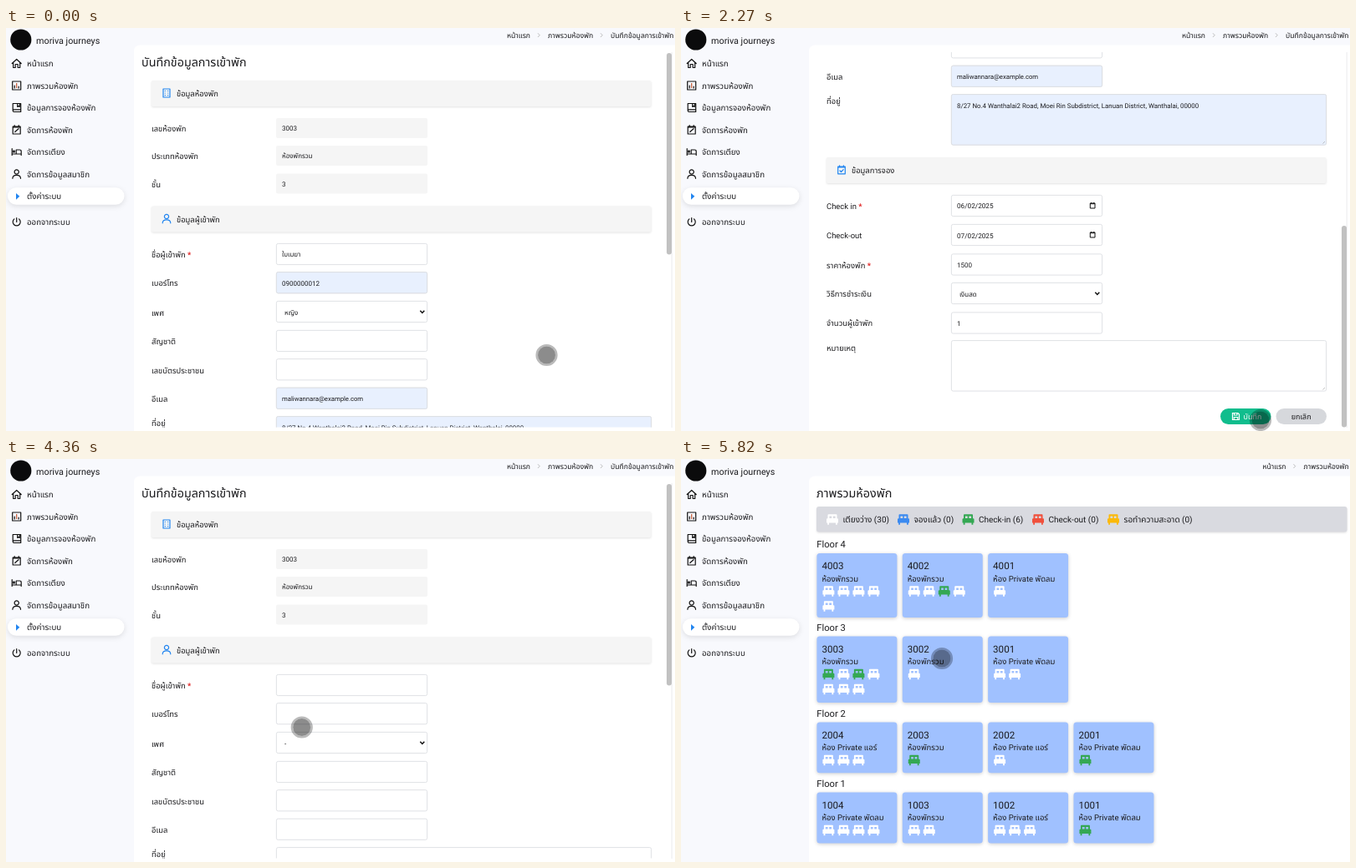
An HTML page that plays this animation: 800 by 483 pixels, repeating every 6 s.

```html
<!DOCTYPE html>
<html lang="th">
<head>
<meta charset="utf-8">
<title>Guest record form</title>
<style>
html, body { margin: 0; width: 100%; height: 100%; overflow: hidden; background: #f8f9fd; }
svg { display: block; width: 800px; height: 483px; }
text { font-family: Roboto, "Noto Sans Thai", "Noto Sans", sans-serif; text-rendering: geometricPrecision; fill: #1c1c1f; white-space: pre; }
#plain text { font-family: "Noto Sans", "Noto Sans Thai Looped", "Noto Sans Thai", sans-serif; fill: #000; }
.line { fill: none; stroke: #111; stroke-width: 1.2; stroke-linejoin: round; stroke-linecap: round; }
.blue { stroke: #2185f0; }
.shadow { filter: drop-shadow(0 1px 1px rgba(0, 0, 0, .11)); }
.card { filter: drop-shadow(0 1px 2px rgba(0, 0, 0, .2)); }
.pill { fill: #fff; filter: drop-shadow(0 2px 3px rgba(0, 0, 0, .11)); }
</style>
</head>
<body>
<svg id="stage" viewBox="0 0 800 483"></svg>
<script>
const FRAME = 1000 / 11, LOOP = 6000;

// ---- drawing helpers ----
const text = (x, y, size, str, attrs = '') =>
  `<text x="${x}" y="${y}" font-size="${size}" ${attrs}>${str}</text>`;
const box = (x, y, w, h, fill, attrs = '') =>
  `<rect x="${x}" y="${y}" width="${w}" height="${h}" fill="${fill}" ${attrs}/>`;
const line = (d, attrs = 'class="line"') => `<path d="${d}" ${attrs}/>`;
const group = (id, body, attrs = '') => `<g id="${id}" ${attrs}>${body}</g>`;
const at = (x, y, body) => `<g transform="translate(${x} ${y})">${body}</g>`;

// ---- side menu ----
const menu = ['หน้าแรก', 'ภาพรวมห้องพัก', 'ข้อมูลการจองห้องพัก', 'จัดการห้องพัก',
  'จัดการเตียง', 'จัดการข้อมูลสมาชิก', 'ตั้งค่าระบบ', 'ออกจากระบบ'];
const menuIcons = [
  'M-5.5 0L0-5L5.5 0M-4-1V5H-1.5V1H1.5V5H4V-1',
  'M-5-5H5V5H-5ZM-2.5 3V0M2.5 3V1',
  'M-4.5 3.5V-5H5V5H-3Q-4.5 5-4.5 3.5Q-4.5 2.3-3 2.3H5M1-5V-1L2.3-2L3.6-1V-5',
  'M-4.5-4H4.5V5H-4.5ZM-4.5-3H4.5M-2.5-5.5V-4M2.5-5.5V-4M-2 2.5L2.3-1.3',
  'M-5.5-4V4M-5.5 2.5H5.5V4M5.5 2.5V-.5Q5.5-2.5 3.5-2.5H-.5V2.5M-4-1.5H-2.5V.3H-4Z',
  'M-2.6-2.6A2.6 2.6 0 1 0 2.6-2.6A2.6 2.6 0 1 0-2.6-2.6M-4.8 5.3Q-4.6 1.4 0 1.4Q4.6 1.4 4.8 5.3',
  '',
  'M0-5V0M-2.8-3.6A4.5 4.5 0 1 0 2.8-3.6'
];
const menuY = [42.5, 69, 95.5, 122, 148.5, 175, 201.5, 232.5];
const plainY = [42.5, 67.5, 93, 118.5, 143.5, 168.5, 193, 223];

const pill = (y, h) => box(2, y - h / 2, 139.5, h, '#fff', `rx="${h / 2}" class="pill"`) +
  line(`M12 ${y - 3.6}L16.3 ${y + .3}L12 ${y + 4.2}Z`, 'fill="#2185f0"');
const styledMenu = pill(201.5, 20.5) + text(36, 18.8, 10.8, 'moriva journeys') + menu.map((m, i) =>
  text(25, menuY[i] + 3.6, 9.75, m) + at(12.7, menuY[i], line(menuIcons[i]))).join('') +
  line('M12.7 72V66', 'stroke="#c2562f" stroke-width="1.2"');
const plainMenu = pill(193, 17.5) + text(36, 18.8, 10, 'moriva journeys') + menu.map((m, i) =>
  text(i === 6 ? 25.5 : 22, plainY[i] + 3.4, 9.75, m, 'font-weight="500"')).join('');

// ---- page frame ----
const crumbs = (items) => items.map(([x, label], i) => text(x, 11.5, 8.65, label) +
  (i ? line(`M${x - 12} 6.3L${x - 9.8} 8.6L${x - 12} 10.9`, 'fill="none" stroke="#aaa" stroke-width=".8"') : '')).join('');
const panel = '<path d="M153 483V28Q153 20.5 160.5 20.5H800V483Z" fill="#fff"/>';

// ---- form ----
const star = '<tspan fill="#e02020" font-weight="700"> *</tspan>';
const label = (y, str) => text(174, y + 3.5, 9.45, str);
const value = (y, str, size = 8, x = 330) => text(x, y + 3, size, str);
const input = (y, fill = '#fff', w = 181, h = 25.2) =>
  box(323.4, y - 12.6, w - .8, h, fill, 'rx="2" stroke="#dcdee2" stroke-width=".9"');
const locked = (y, str) => box(323, y - 12, 181, 24, '#f5f5f5', 'rx="2"') + value(y, str);
const arrow = (y) => line(`M495.3 ${y - 1.3}L497.8 ${y + 1.4}L500.3 ${y - 1.3}`, 'fill="none" stroke="#111" stroke-width="1.5"');
const calendar = (y) => line(`M489.3 ${y - 3}H495V${y + 3}H489.3ZM489.3 ${y - 2.3}H495M490.5 ${y - 3.8}V${y - 3}M493.8 ${y - 3.8}V${y - 3}`,
  'fill="none" stroke="#111" stroke-width="1"');
const section = (y, str, icon) => box(174, y, 597.5, 31, '#f5f5f5', 'rx="2" class="shadow"') +
  at(192, y + 15, line(icon, 'class="line blue"')) + text(204, y + 19, 9.45, str);

const building = 'M-4-5H4V5H-4ZM-1.8-2.7H-1.6M1.6-2.7H1.8M-1.8 0H-1.6M1.6 0H1.8M-1.8 2.7H-1.6M1.6 2.7H1.8';
const booked = 'M-4.3-4H4.3V4.8H-4.3ZM-4.3-3H4.3M-2.4-5.2V-4M2.4-5.2V-4M-2 1L-.5 2.5L2.2-.3';

const labels = [
  [120, 'เลขห้องพัก'], [153.5, 'ประเภทห้องพัก'], [187, 'ชั้น'],
  [271, 'ชื่อผู้เข้าพัก' + star], [305.5, 'เบอร์โทร'], [341, 'เพศ'], [375.5, 'สัญชาติ'],
  [410, 'เลขบัตรประชาชน'], [444, 'อีเมล'], [473, 'ที่อยู่'],
  [599, 'Check in' + star], [634.5, 'Check-out'], [670, 'ราคาห้องพัก' + star],
  [704.5, 'วิธีการชำระเงิน'], [739.5, 'จำนวนผู้เข้าพัก'], [769, 'หมายเหตุ']
];
const AUTO = '#e8f0fe';
const filled = input(305.2, AUTO) + input(443.8, AUTO) + input(478.2, AUTO, 449, 60.5) +
  value(271, 'ใบเมฆา') + value(305.5, '0900000012') + value(340.5, 'หญิง', 8, 333) +
  value(444, 'maliwannara@example.com', 7.7) +
  value(479, '8/27 No.4 Wanthalai2 Road, Moei Rin Subdistrict, Lanuan District, Wanthalai, 00000', 7.85) +
  value(599, '06/02/2025', 8.2) + value(634.5, '07/02/2025', 8.2) + value(669.5, '1500') +
  value(704.5, 'เงินสด', 8, 333) + value(739.5, '1');
const grip = (y) => line(`M767.5 ${y}L770 ${y - 2.5}`, 'stroke="#999" stroke-width=".6"');

const buttons = box(645, 842, 60.5, 19, '#10bd8d', 'rx="9.5"') + box(711.5, 842, 60.5, 19, '#d6d8dc', 'rx="9.5"') +
  at(663.5, 851.5, line('M-4-4H2.5L4-2.5V4H-4ZM-2-4V-1.5H1.5V-4M-2.2 4V1H2.2V4', 'fill="none" stroke="#fff" stroke-width="1.2"')) +
  text(672.5, 855, 9, 'บันทึก', 'font-weight="500" style="fill:#fff"') +
  text(741.7, 855, 9, 'ยกเลิก', 'text-anchor="middle"');

const formBody = text(162, 46, 14.35, 'บันทึกข้อมูลการเข้าพัก') +
  section(63, 'ข้อมูลห้องพัก', building) + section(213.5, 'ข้อมูลผู้เข้าพัก', menuIcons[5]) +
  section(541, 'ข้อมูลการจอง', booked) +
  labels.map(([y, s]) => label(y, s)).join('') +
  locked(120, '3003') + locked(153, 'ห้องพักรวม') + locked(186.5, '3') +
  [271, 305.2, 340, 375, 409.3, 443.8, 599, 634, 669.5, 704, 739.5].map((y) => input(y)).join('') +
  input(478.2, '#fff', 449, 60.5) + input(773.2, '#fff', 449, 60.5) +
  group('filled', filled) + group('cleared', value(340.5, '-', 8, 333)) +
  grip(524.5) + grip(819.5) + arrow(340) + arrow(704) + calendar(599) + calendar(634) + buttons;

const form = panel + crumbs([[599, 'หน้าแรก'], [648, 'ภาพรวมห้องพัก'], [723, 'บันทึกข้อมูลการเข้าพัก']]) +
  `<g clip-path="url(#view)">${group('scroll', formBody)}</g>` +
  box(795.5, 29, 1.5, 450, '#f1f1f3') + box(790, 30, 6, 241.5, '#c1c1c1', 'rx="3" id="thumb"');

// ---- room overview ----
const tint = { w: '#fff', b: '#3b8af0', g: '#34a853', r: '#f0503c', y: '#fbb90a' };
const bed = (x, y, c) => at(x, y, line('M-4.6-6.3H4.6Q5.5-6.3 5.5-5.4V-1.3H6Q7-1.3 7-.3V4H5.8V6.3H4V4H-4V6.3H-5.8V4H-7V-.3Q-7-1.3-6-1.3H-5.5V-5.4Q-5.5-6.3-4.6-6.3ZM-3.6-4H-.8V-1.6H-3.6ZM.8-4H3.6V-1.6H.8Z',
  `fill="${tint[c]}" fill-rule="evenodd"`));
const legend = [[181, 'w', 'เตียงว่าง (30)'], [266, 'b', 'จองแล้ว (0)'], [343.5, 'g', 'Check-in (6)'],
  [427, 'r', 'Check-out (0)'], [517, 'y', 'รอทำความสะอาด (0)']];
const kinds = { s: 'ห้องพักรวม', f: 'ห้อง Private พัดลม', a: 'ห้อง Private แอร์' };
const floors = [
  [4, 113, 77, '4003 s wwwww', '4002 s wwgw', '4001 f w'],
  [3, 212.5, 79.5, '3003 s gwgwwww', '3002 s w', '3001 f ww'],
  [2, 315.5, 60.8, '2004 a www', '2003 s g', '2002 a w', '2001 f g'],
  [1, 399.5, 61, '1004 f wwww', '1003 s ww', '1002 a www', '1001 f g']
];
const room = (spec, x, y, h) => {
  const [no, kind, beds] = spec.split(' ');
  return box(x, y, 96, h, '#a0c1ff', 'rx="3.5" class="card"') +
    text(x + 6, y + 19.2, 11.6, no) + text(x + 6, y + 33.8, 9.55, kinds[kind]) +
    [...beds].map((c, i) => bed(x + 14 + i % 4 * 18, y + 45.5 + (i >> 2) * 18, c)).join('');
};
const overview = panel + crumbs([[695.5, 'หน้าแรก'], [744.5, 'ภาพรวมห้องพัก']]) +
  text(162, 46, 14.35, 'ภาพรวมห้องพัก') + box(162, 57, 634.5, 30.5, '#d9dae0', 'rx="3" class="shadow"') +
  legend.map(([x, c, s]) => bed(x, 72.5, c) + text(x + 12.5, 75.8, 10, s)).join('') +
  floors.map(([n, y, h, ...rooms]) => text(162.3, y - 7, 11.2, 'Floor ' + n) +
    rooms.map((r, i) => room(r, 162.4 + i * 102.35, y, h)).join('')).join('');

// ---- dialog ----
const tick = (id) => box(0, -2.5, 0, 5, '#a5dc86', `rx="2" id="${id}"`);
const dialog = box(243, 143.7, 302, 192, '#fff', 'rx="3"') +
  '<g transform="translate(394 195) scale(.632)"><circle r="42" fill="none" stroke="#a5dc86" stroke-opacity=".25" stroke-width="4"/>' +
  tick('tip') + tick('long') + '</g>' +
  text(394, 257.5, 18.6, 'แก้ไขข้อมูลสำเร็จ', 'text-anchor="middle" font-weight="600" style="fill:#575757"') +
  box(367, 295.5, 54, 29.5, '#8cd4f5', 'rx="3"') +
  text(394, 314, 10.6, 'OK', 'text-anchor="middle" font-weight="500" style="fill:#fff"');

const stage = document.getElementById('stage');
stage.innerHTML = '<clipPath id="view"><rect x="153" y="29" width="647" height="449.5"/></clipPath>' +
  box(0, 0, 800, 483, '#f8f9fd') +
  group('styled', styledMenu) + group('plain', plainMenu) +
  '<circle cx="17.8" cy="14" r="12.6" fill="#0b0b0c"/>' +
  group('form', form) + group('overview', overview) +
  group('modal', box(0, 0, 800, 483, '#000', 'fill-opacity=".4"') + group('dialog', dialog)) +
  group('cursor', group('dot', '<circle r="10.5" fill-opacity=".45"/><circle r="11.8" fill="none" stroke="#000" stroke-opacity=".27" stroke-width="2.6"/>') +
    group('pointer', line('M0 0V13L3 10.2L5.2 15L7.2 14.1L5.1 9.4H9.2Z', 'fill="#fff" stroke="#111" stroke-width=".9"')));

// ---- motion: [step, ...values] ----
const scroll = [[1, 0, 30], [9, 155, 107], [12, 252, 163], [13, 252, 163], [15, 381, 234], [16, 386, 237], [29, 386, 237], [29.9, 0, 30]];
const cursor = [[1, 646.5, 392], [9, 634.5, 387], [15, 642.5, 387], [16, 643, 387], [18, 643, 387], [23, 684, 468], [24, 684, 468],
  [25, 693, 470], [28, 342, 397], [29, 342, 397], [34, 489, 308], [41, 460, 335], [46, 394, 310], [47, 394, 310],
  [51, 233, 356], [57, 410, 276], [59, 295, 212], [61, 308, 238], [63, 308, 238], [64, 312, 239]];
const fade = [[36, 0], [39.5, 1], [46, 1], [48, 0]];
const pop = [[37, .7], [38.5, 1.05], [39.6, .95], [40.3, 1], [46, 1], [48, .7]];
const tip = [[41.5, 1, 19, 0], [42.8, -8, 37, 50], [43.9, 21, 48, 17], [45.2, 14, 45, 25]];
const long = [[42.4, 34, 54, 0], [43.9, 25, 35, 55], [45.2, 25, 38, 47]];

const sample = (track, k) => {
  const i = track.findIndex((p) => p[0] > k);
  if (i < 1) return track.at(i).slice(1);
  const a = track[i - 1], b = track[i], f = (k - a[0]) / (b[0] - a[0]);
  return a.slice(1).map((v, j) => v + (b[j + 1] - v) * f);
};

const el = (id) => document.getElementById(id);
const show = (id, on) => el(id).setAttribute('visibility', on ? 'inherit' : 'hidden');
const move = (id, value) => el(id).setAttribute('transform', value);
const stroke = (id, [left, top, w], angle) => {
  el(id).setAttribute('width', w);
  move(id, `translate(${left + w / 2 - 40} ${top - 37.5}) rotate(${angle}) translate(${-w / 2} 0)`);
};

function draw(t) {
  const k = Math.min(64, Math.floor((t + 5) / FRAME));
  const loading = k >= 51 && k < 53;
  show('form', k < 51);
  show('overview', k >= 53);
  show('plain', loading);
  show('styled', !loading);
  show('filled', k < 30);
  show('cleared', k >= 30);

  const [top, thumb] = sample(scroll, k);
  move('scroll', `translate(0 ${-top})`);
  el('thumb').setAttribute('y', thumb);

  show('modal', k >= 37 && k < 48);
  el('modal').setAttribute('opacity', sample(fade, k)[0]);
  move('dialog', `translate(394 240) scale(${sample(pop, k)[0]}) translate(-394 -240)`);
  stroke('tip', sample(tip, k), 45);
  stroke('long', sample(long, k), -45);

  move('cursor', `translate(${sample(cursor, k).join(' ')})`);
  show('dot', !loading);
  show('pointer', loading);
}

const start = performance.now();
function tickFrame(now) {
  draw(Math.max(0, now - start) % LOOP);
  requestAnimationFrame(tickFrame);
}
draw(0);
requestAnimationFrame(tickFrame);
</script>
</body>
</html>
```
